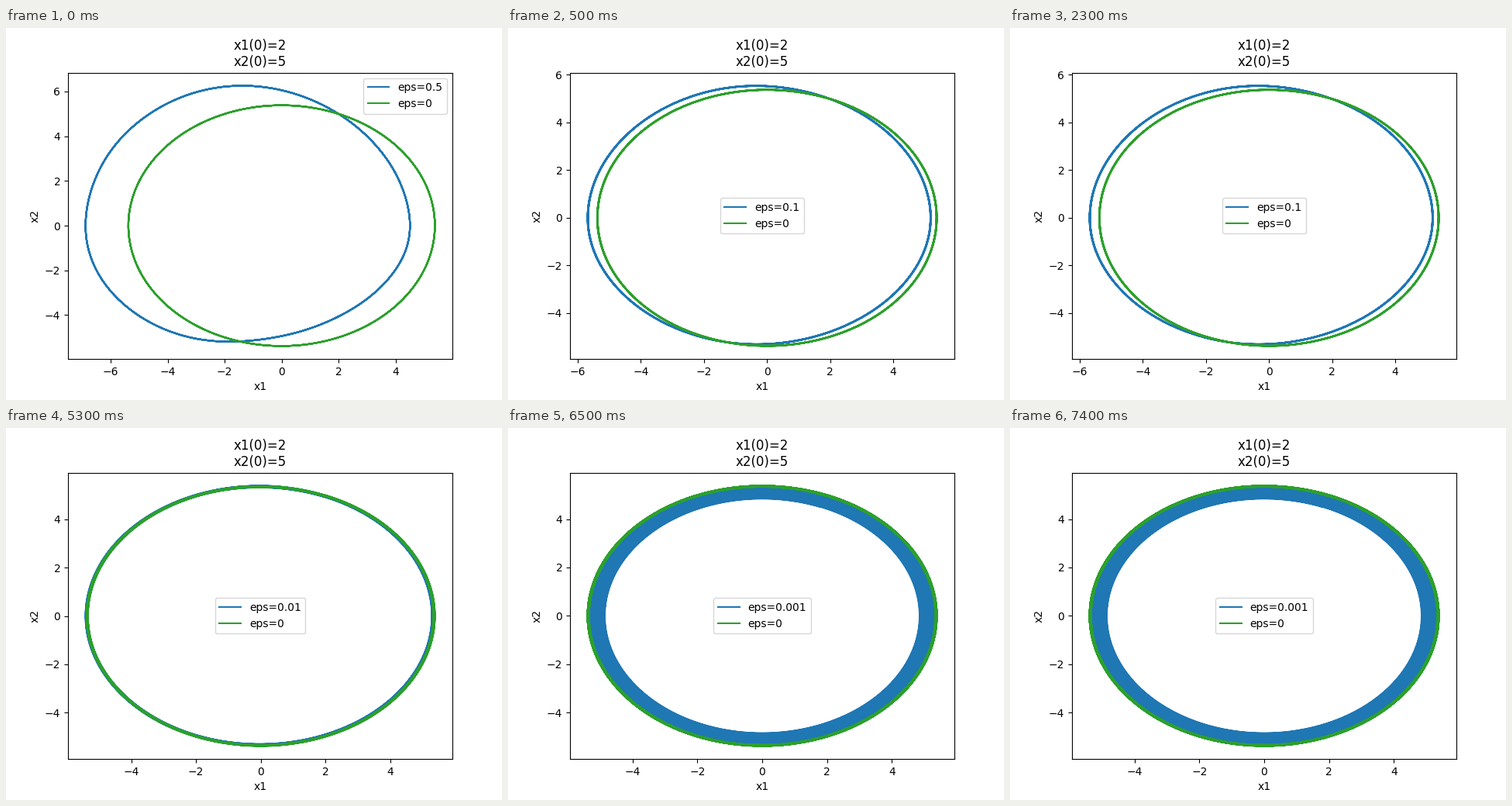
Recreate the animation shown at these times as a matplotlib script. Size 640 by 480 pixels, loop 8 s.

```python
import numpy as np
import matplotlib.pyplot as plt
from matplotlib.animation import FuncAnimation

R0 = np.hypot(2, 5)
START = np.arctan2(5, 2)
HARMONICS = np.arange(1, 13)

# Orbit shape: (angle in degrees, radius, slope or None)
STRONG = [(0, 4.51, 0), (68.2, R0, None), (102.4, 6.41, 1.413),
          (180, 6.89, 0), (250.5, 5.506, -1.95), (270, 4.94, None)]
WEAK = [(0, 5.195, 0), (68.2, R0, None), (93.6, 5.561, 0.35),
        (180, 5.69, 0), (266.6, 5.33, -0.33)]

# label, first step, blue loss, green loss, turns, legend place
SCENES = [("0.5", 0, 0.006, 0.006, 6, "upper right"),
          ("0.1", 1, 0.02, 0.02, 10, "center"),
          ("0.01", 7, 0.08, 0.05, 20, "center"),
          ("0.001", 13, 0.54, 0.05, 60, "center")]


def basis(a, slope=False):
    k = HARMONICS
    ka = np.outer(np.atleast_1d(a), k)
    if slope:
        return np.hstack([np.zeros((len(ka), 1)),
                          -np.sin(ka) / k, np.cos(ka) / k])
    return np.hstack([np.ones((len(ka), 1)),
                      np.cos(ka) / k**2, np.sin(ka) / k**2])


def fit(knots):
    """Smoothest periodic radius through the knots."""
    rows, values = [], []
    for deg, r, slope in knots:
        a = np.radians(deg)
        rows.append(basis(a)[0])
        values.append(r)
        if slope is not None:
            rows.append(basis(a, True)[0])
            values.append(slope)
    return np.linalg.lstsq(np.array(rows), np.array(values), rcond=None)[0]


STRONG_FIT, WEAK_FIT = fit(STRONG), fit(WEAK)


def radius(a, eps):
    if eps == 0.5:
        return basis(a) @ STRONG_FIT
    return R0 + eps / 0.1 * (basis(a) @ WEAK_FIT - R0)


def orbit(eps, loss, turns):
    """Clockwise orbit that slowly shrinks."""
    t = np.linspace(0, 1, turns * 160 + 1)
    a = START - 2 * np.pi * turns * t
    r = radius(a, eps) * (1 - loss / R0 * t)
    return r * np.cos(a), r * np.sin(a)


fig, ax = plt.subplots(figsize=(6.4, 4.8), dpi=100)


def draw(step):
    scene = [s for s in SCENES if s[1] <= step][-1]
    label, _, blue_loss, green_loss, turns, place = scene
    ax.clear()
    ax.plot(*orbit(float(label), blue_loss, turns), "C0",
            label=f"eps={label}")
    ax.plot([2, 2.01], [5, 5], "C1")
    ax.plot(*orbit(0, green_loss, turns), "C2", label="eps=0")
    ax.set_title("x1(0)=2\nx2(0)=5")
    ax.set_xlabel("x1")
    ax.set_ylabel("x2")
    ax.legend(loc=place)
    return []


anim = FuncAnimation(fig, draw, frames=16, interval=500,
                     init_func=lambda: [], repeat=True, repeat_delay=0)
plt.show()
```
